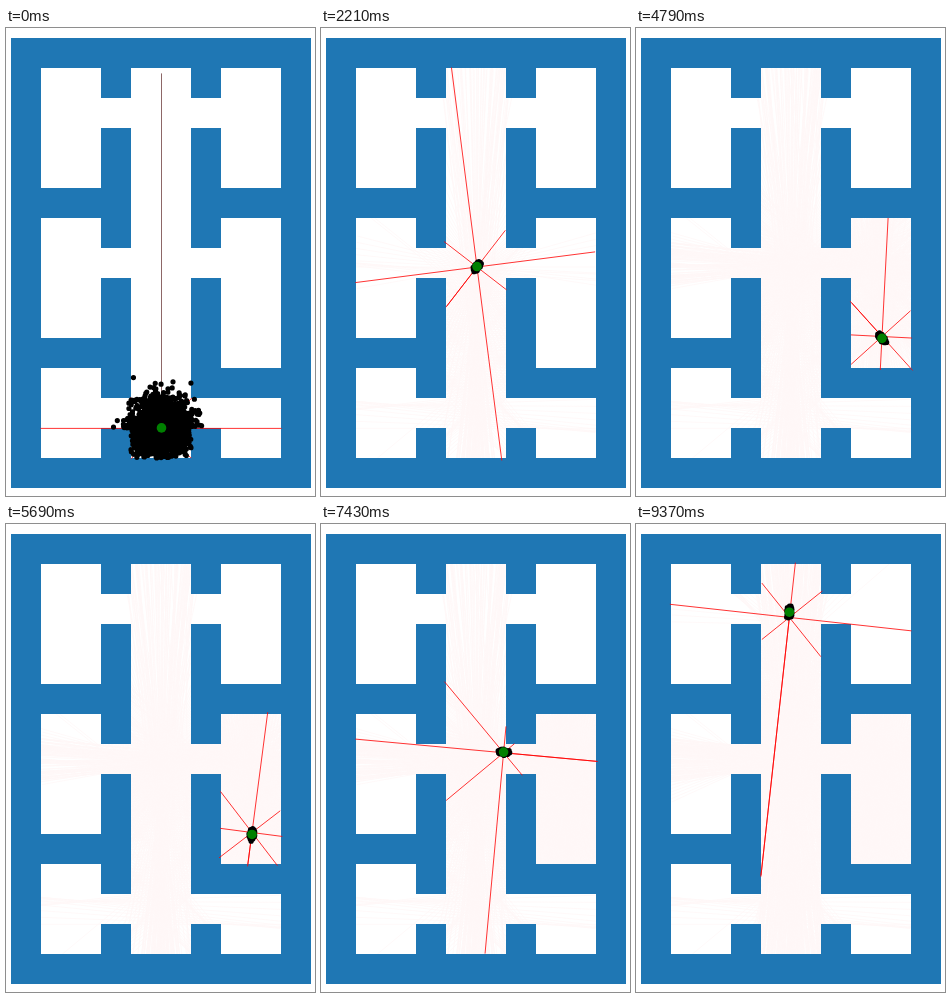
These frames come from a looping animation (309 px wide and 468 px high, 9.65 s). An HTML page with a canvas:

```html
<!DOCTYPE html>
<html>
<head>
<meta charset="utf-8">
<style>
html, body { margin: 0; width: 100%; height: 100%; overflow: hidden; background: #fff; }
canvas { display: block; }
</style>
</head>
<body>
<canvas id="stage" width="309" height="468"></canvas>
<script>
const W = 309, H = 468, LOOP = 9650, WAKE = 450, START = 670, STEP = 20, END = 9370;
const CELL = 30, LEFT = 5, TOP = 10, TURN_RATE = 0.145, WOBBLE = 6.5;
const ctx = document.getElementById('stage').getContext('2d');

const map = `
##########
#..#..#..#
#........#
#..#..#..#
#..#..#..#
####..####
#..#..#..#
#........#
#..#..#..#
#..#..#..#
####..#..#
#..#..####
#........#
#..#..#..#
##########`.trim().split('\n');

const isFree = (x, y) => map[Math.floor((y - TOP) / CELL)][Math.floor((x - LEFT) / CELL)] === '.';
const floor = new Path2D();
map.forEach((row, j) => [...row].forEach((cell, i) => {
  if (cell === '.') floor.rect(LEFT + i * CELL, TOP + j * CELL, CELL, CELL);
}));

// Stops of the robot: arrival time and place. It turns first, then drives.
const stops = [
  [START, 155.5, 399.9], [1950, 156, 238.5], [3270, 243, 236], [4500, 246, 308],
  [6360, 245, 237], [7650, 152, 224], [9470, 153.5, 81]
];
let facing = 90;
const legs = stops.slice(1).map(([arrive, x, y], i) => {
  const [depart, x0, y0] = stops[i];
  const heading = Math.round(Math.atan2(y0 - y, x - x0) * 2 / Math.PI) * 90;
  const leg = { depart, arrive, x0, y0, x, y, facing, turn: 180 - (facing - heading + 540) % 360 };
  leg.go = depart + Math.abs(leg.turn) / TURN_RATE;
  facing += leg.turn;
  return leg;
});

function poseAt(time) {
  const t = Math.max(time, START);
  const leg = legs.find(l => t <= l.arrive);
  const turned = leg.turn * Math.min(1, (t - leg.depart) / (leg.go - leg.depart || 1));
  const u = Math.max(0, (t - leg.go) / (leg.arrive - leg.go));
  const heading = leg.facing + turned - WOBBLE * Math.sin(u * 7 * Math.PI);
  return {
    x: leg.x0 + (leg.x - leg.x0) * u,
    y: leg.y0 + (leg.y - leg.y0) * u,
    angle: heading * Math.PI / 180
  };
}

function seeded(seed) {
  let s = seed * 2654435761 >>> 0;
  return () => {
    s = s + 0x6D2B79F5 >>> 0;
    let n = Math.imul(s ^ s >>> 15, s | 1);
    n ^= n + Math.imul(n ^ n >>> 7, n | 61);
    return ((n ^ n >>> 14) >>> 0) / 4294967296;
  };
}
const gauss = rnd => Math.sqrt(-2 * Math.log(1 - rnd())) * Math.cos(2 * Math.PI * rnd());

// Nine beams over a full turn; the first and the last both point backwards
function scan(time) {
  const { x, y, angle } = poseAt(time);
  const rnd = seeded(time + 7);
  const moving = time > START;
  return Array.from({ length: 9 }, (_, i) => {
    const a = angle + Math.PI * (i / 4 - 1);
    const dx = Math.cos(a), dy = -Math.sin(a);
    let range = 0;
    while (isFree(x + dx * range, y + dy * range)) range++;
    const noise = gauss(rnd), outlier = rnd() < 0.015, scale = rnd() * 1.3;
    if (moving) range = outlier ? range * scale : Math.max(0, range + noise);
    return [x, y, x + dx * range, y + dy * range];
  });
}

function drawBeam(c, [x1, y1, x2, y2]) {
  c.beginPath();
  c.moveTo(x1, y1 + 0.5);
  c.lineTo(x2, y2 + 0.5);
  c.stroke();
}

// Faint residue of all earlier beams
const trailCanvas = document.createElement('canvas');
trailCanvas.width = W;
trailCanvas.height = H;
const trail = trailCanvas.getContext('2d');
trail.strokeStyle = 'rgba(255,248,248,.8)';
let trailTime = START;

function updateTrail(time) {
  if (time < trailTime) {
    trail.clearRect(0, 0, W, H);
    trailTime = START;
  }
  for (; trailTime < time; trailTime += STEP) {
    scan(trailTime).forEach(beam => drawBeam(trail, beam));
  }
}

function dot(x, y, r) {
  ctx.moveTo(x + r, y);
  ctx.arc(x, y, r, 0, 2 * Math.PI);
}

function drawParticles(time) {
  const { x, y, angle } = poseAt(time);
  const rnd = seeded(time + 3);
  const progress = Math.max(0, time - START) / (END - START);
  // The estimate drifts away from the middle of the map
  const cy = y + Math.min(1, progress * 2) * (y - H / 2) / 30;
  const spread = time < WAKE ? 15 : 7 * Math.exp(-Math.max(0, time - START) / 120);
  const along = Math.max(spread, 1.8), across = Math.max(spread, 0.85);
  const c = Math.cos(angle), s = Math.sin(angle);
  ctx.fillStyle = '#000';
  ctx.beginPath();
  for (let i = 0; i < 2000; i++) {
    const p = gauss(rnd) * along, q = gauss(rnd) * across;
    const px = x + p * c - q * s, py = cy - p * s - q * c;
    if (isFree(px, py)) dot(px, py, 2.6);
  }
  ctx.fill();
  ctx.fillStyle = '#008000';
  ctx.beginPath();
  dot(x, cy, 4.8);
  ctx.fill();
}

function draw(t) {
  let time = t < WAKE ? 0 : Math.min(END, WAKE + STEP * Math.floor((t - WAKE) / STEP));
  if (time >= WAKE && time <= START) time = WAKE;
  ctx.fillStyle = '#fff';
  ctx.fillRect(0, 0, W, H);
  ctx.fillStyle = '#1f77b4';
  ctx.fillRect(LEFT, TOP, 10 * CELL, 15 * CELL);
  ctx.fillStyle = '#fff';
  ctx.fill(floor);
  ctx.save();
  ctx.clip(floor);
  updateTrail(time);
  ctx.drawImage(trailCanvas, 0, 0);
  ctx.restore();

  ctx.lineWidth = 0.8;
  scan(time).forEach((beam, i) => {
    const front = i === 4 && time < WAKE;
    ctx.strokeStyle = front ? '#704040' : '#f00';
    if (front) beam[3] += 5;
    drawBeam(ctx, beam);
  });
  drawParticles(time);
}

function tick() {
  draw(performance.now() % LOOP);
  requestAnimationFrame(tick);
}
tick();
</script>
</body>
</html>
```
